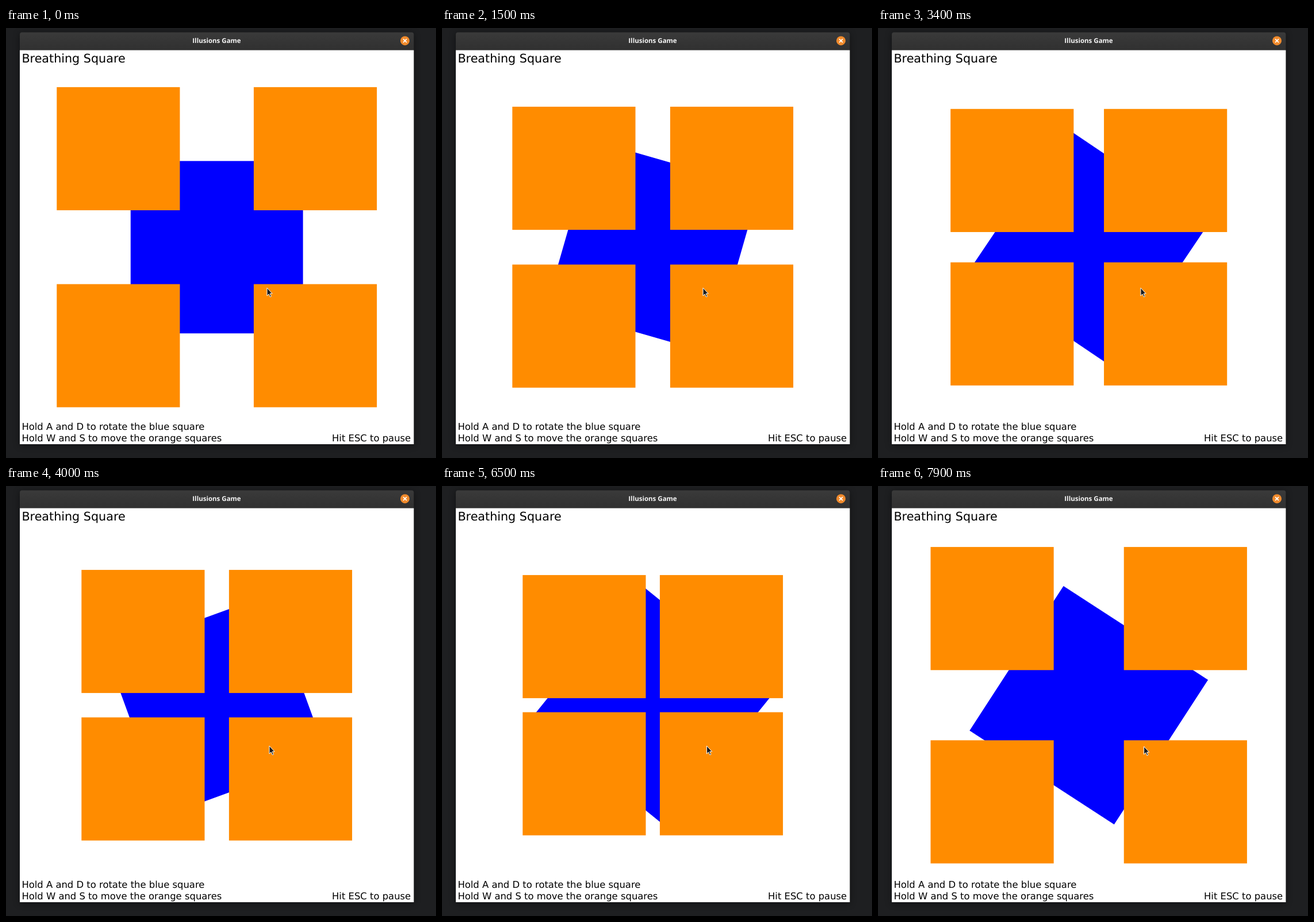
An HTML page that plays this animation: 748 px wide and 748 px high, repeating every 8 s.

```html
<!DOCTYPE html>
<html lang="en">
<head>
<meta charset="utf-8">
<title>Breathing Square</title>
<style>
html, body { margin: 0; width: 100%; height: 100%; overflow: hidden; background: #1e1f21; }
svg { display: block; width: 100vw; height: 100vh; }
text { font: 16.42px "DejaVu Sans", sans-serif; text-rendering: geometricPrecision; }
.head { font-size: 20.7px; }
.title { font: bold 11.5px "Open Sans", sans-serif; font-stretch: 88%; fill: #f6f6f6; text-anchor: middle; }
.window { filter: drop-shadow(0 2px 6px rgba(0, 0, 0, .45)); }
</style>
</head>
<body>
<svg viewBox="0 0 748 748">
  <defs>
    <linearGradient id="bar" x2="0" y2="1">
      <stop stop-color="#3a3a3a"/>
      <stop offset="1" stop-color="#303030"/>
    </linearGradient>
  </defs>
  <g class="window">
    <path d="M24 39V11.5q0-4 4-4H705.4q4 0 4 4V39z" fill="url(#bar)"/>
    <rect x="24" y="38.6" width="685.4" height="685.4" fill="#fff"/>
  </g>
  <text class="title" x="366.5" y="26.3">Illusions Game</text>
  <circle cx="694" cy="22.2" r="8" fill="#f08a2c"/>
  <path d="M691 19.2l6 6m0-6l-6 6" stroke="#fff" stroke-width="1.7"/>
  <!-- the game board is 800 units wide, centred on 0,0 -->
  <g transform="translate(366.7 381.3) scale(.8567)">
    <rect id="blue" x="-175" y="-175" width="350" height="350" fill="#00f"/>
    <g id="corners" fill="#ff8c00"></g>
  </g>
  <text class="head" x="27.4" y="60.3">Breathing Square</text>
  <text x="27.4" y="698.6">Hold A and D to rotate the blue square</text>
  <text x="27.4" y="718.6">Hold W and S to move the orange squares</text>
  <text x="567" y="718.6">Hit ESC to pause</text>
  <path id="cursor" d="M.5 1V14.8L3.6 11.9L5.9 16.8L8 15.9L5.8 11H9.8z" fill="#1b1b1b" stroke="#fff" stroke-linejoin="round"/>
</svg>
<script>
const LOOP = 8000, STEP = 100;
const blue = document.getElementById('blue');
const corners = document.getElementById('corners');
const cursor = document.getElementById('cursor');
const clamp = (v, lo, hi) => Math.min(hi, Math.max(lo, v));

const squares = [[-1, -1], [1, -1], [-1, 1], [1, 1]].map(([sx, sy]) => {
  const el = document.createElementNS('http://www.w3.org/2000/svg', 'rect');
  el.setAttribute('width', 250);
  el.setAttribute('height', 250);
  corners.append(el);
  return { el, sx, sy };
});

// Degrees at step k: one turn key held, with two small hitches
function angle(k) {
  if (k < 13) return 0;
  return 4 + 6 * (k - 13) - (k > 24 ? 6 : 0) - (k > 51 ? 1 : 0);
}

// Inward travel in board units: in, rest, in, rest, out
function travel(k) {
  let ticks = 0;
  if (k >= 7) ticks = Math.min(59, 5 + 6 * (k - 7));
  if (k >= 38) ticks = clamp(61 + 6 * (k - 39), 59, 81);
  if (k >= 66) ticks = Math.min(81, 77 - 6 * (k - 67));
  return ticks * .75;
}

// Slow drift of the pointer, as [step, x]
const drift = [[0, 453.5], [15, 453.5], [24, 454.5], [40, 457.5], [51, 459], [72, 460.5], [79, 462]];
function pointerX(k) {
  const i = Math.max(1, drift.findIndex(p => p[0] >= k));
  const [k0, x0] = drift[i - 1], [k1, x1] = drift[i];
  return x0 + (x1 - x0) * (k - k0) / (k1 - k0);
}

function draw(now) {
  const k = Math.floor(now % LOOP / STEP);
  blue.setAttribute('transform', `rotate(${angle(k)})`);
  const gap = 75 - travel(k);
  for (const { el, sx, sy } of squares) {
    el.setAttribute('x', sx < 0 ? -gap - 250 : gap);
    el.setAttribute('y', sy < 0 ? -gap - 250 : gap);
  }
  cursor.setAttribute('transform', `translate(${pointerX(k)} ${k > 75 ? 452 : 451})`);
}

function loop() {
  draw(performance.now());
  requestAnimationFrame(loop);
}
loop();
</script>
</body>
</html>
```
